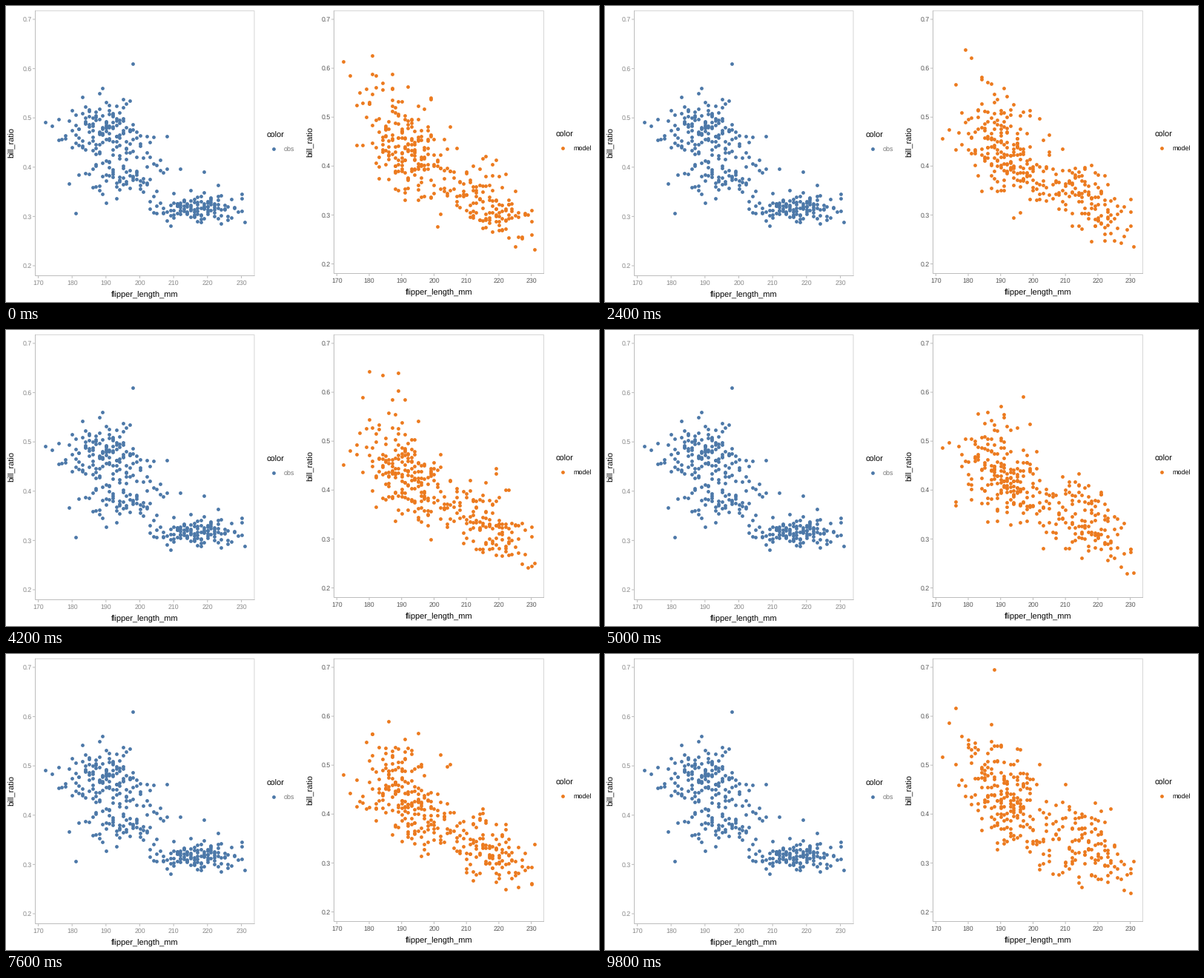
These frames come from a looping animation (800 px wide and 400 px high, 10 s). A matplotlib script:

```python
import numpy as np
import matplotlib.pyplot as plt
from matplotlib.animation import FuncAnimation

W, H, DPI = 800, 400, 100
PX = 72 / DPI  # points per pixel
BLUE, ORANGE = "#4c78a8", "#ec7a1e"
FRAMES, STEP = 50, 200

plt.rcParams["font.family"] = "Liberation Sans"
plt.rcParams["text.hinting"] = "none"

# Points that stand apart from the clusters
OUTLIERS = [(172, .491), (174, .484), (181, .307), (198, .610),
            (208, .463), (219, .390), (223, .363), (231, .289)]


def bell(n):
    """n evenly spread quantiles of the normal distribution."""
    big = np.random.default_rng(1).standard_normal(20000)
    return np.quantile(big, (np.arange(n) + .5) / n)


def cluster(n, length, length_sd, ratio, ratio_sd, low, high, seed):
    x = np.clip(np.rint(length + length_sd * bell(n)), low, high)
    y = ratio + ratio_sd * bell(n)
    return x, np.random.default_rng(seed).permutation(y)


def observed():
    parts = [
        cluster(147, 190, 6.2, .473, .033, 176, 210, 3),
        cluster(67, 196, 6.8, .379, .021, 178, 212, 4),
        cluster(120, 217, 6.5, .317, .014, 203, 230, 5),
        np.transpose(OUTLIERS),
    ]
    return np.hstack(parts)


flipper, bill = observed()


def sample(i):
    """One random draw from a log-linear model of the ratio."""
    z = np.random.default_rng(100 + i).standard_normal(flipper.size)
    mean = .437 * np.exp(-.0106 * (flipper - 190))
    return np.clip(mean * np.exp(.118 * z), .205, .695)


fig = plt.figure(figsize=(W / DPI, H / DPI), dpi=DPI, facecolor="white")
ax = fig.add_axes([0, 0, 1, 1])
ax.set_xlim(0, W)
ax.set_ylim(H, 0)
ax.axis("off")


def text(x, y, s, size, color="black", ha="left", **kw):
    kw.setdefault("va", "baseline")
    ax.text(x, y, s, fontsize=size * PX, color=color, ha=ha, **kw)


def line(xs, ys, color):
    ax.plot(xs, ys, color=color, lw=PX, snap=False,
            solid_capstyle="projecting", solid_joinstyle="miter")


def dots(xs, ys, color):
    return ax.plot(xs, ys, "o", color=color, ms=4.8 * PX, mew=0,
                   snap=False)[0]


class Panel:
    def __init__(self, box, x170, dx, dy, color, tick_color):
        self.box, self.x170, self.dx, self.dy = box, x170, dx, dy
        self.color, self.tick_color = color, tick_color
        self.frame()

    def x(self, v):
        return self.x170 + (v - 170) * self.dx

    def y(self, v):
        return 18 + (.7 - v) * self.dy

    def frame(self):
        l, t, r, b = self.box
        line([l, r, r], [t, t, b], "#d6d6d6")
        line([l, l, r], [t, b, b], "#bdbdbd")
        for v in range(170, 231, 10):
            x = self.x(v)
            line([x, x], [b, b + 3], "#bdbdbd")
            text(x, b + 12.3, str(v), 8.8, self.tick_color, "center")
        for k in range(2, 8):
            y = self.y(k / 10)
            line([l - 3, l], [y, y], "#bdbdbd")
            text(l - 5, y + 3.1, f"0.{k}", 8.8, self.tick_color, "right")
        text((l + r) / 2, b + 28.8, "flipper_length_mm", 11, ha="center")
        text(l - 31, (t + b) / 2 - .7, "bill_ratio", 11, ha="center",
             va="center", rotation=90)

    def legend(self, x, y, dot, label, color):
        text(x, y, "color", 11)
        dots([x + dot], [y + 14.7], self.color)
        text(x + 23, y + 18, label, 9, color)

    def plot(self, ratio):
        return dots(self.x(flipper), self.y(ratio), self.color)


left = Panel((39.5, 6.5, 335, 364.5), 43.5, 4.567, 666, BLUE, "#888888")
left.legend(352, 178, 9, "obs", "#777777")
left.plot(bill)

right = Panel((442.5, 6.5, 725.5, 361.5), 446.3, 4.372, 661, ORANGE, "#555555")
right.legend(742, 177, 8.8, "model", "black")
cloud = right.plot(sample(0))


def update(i):
    cloud.set_ydata(right.y(sample(i)))
    return (cloud,)


anim = FuncAnimation(fig, update, frames=FRAMES, interval=STEP,
                     repeat=True, repeat_delay=0)
plt.show()
```
